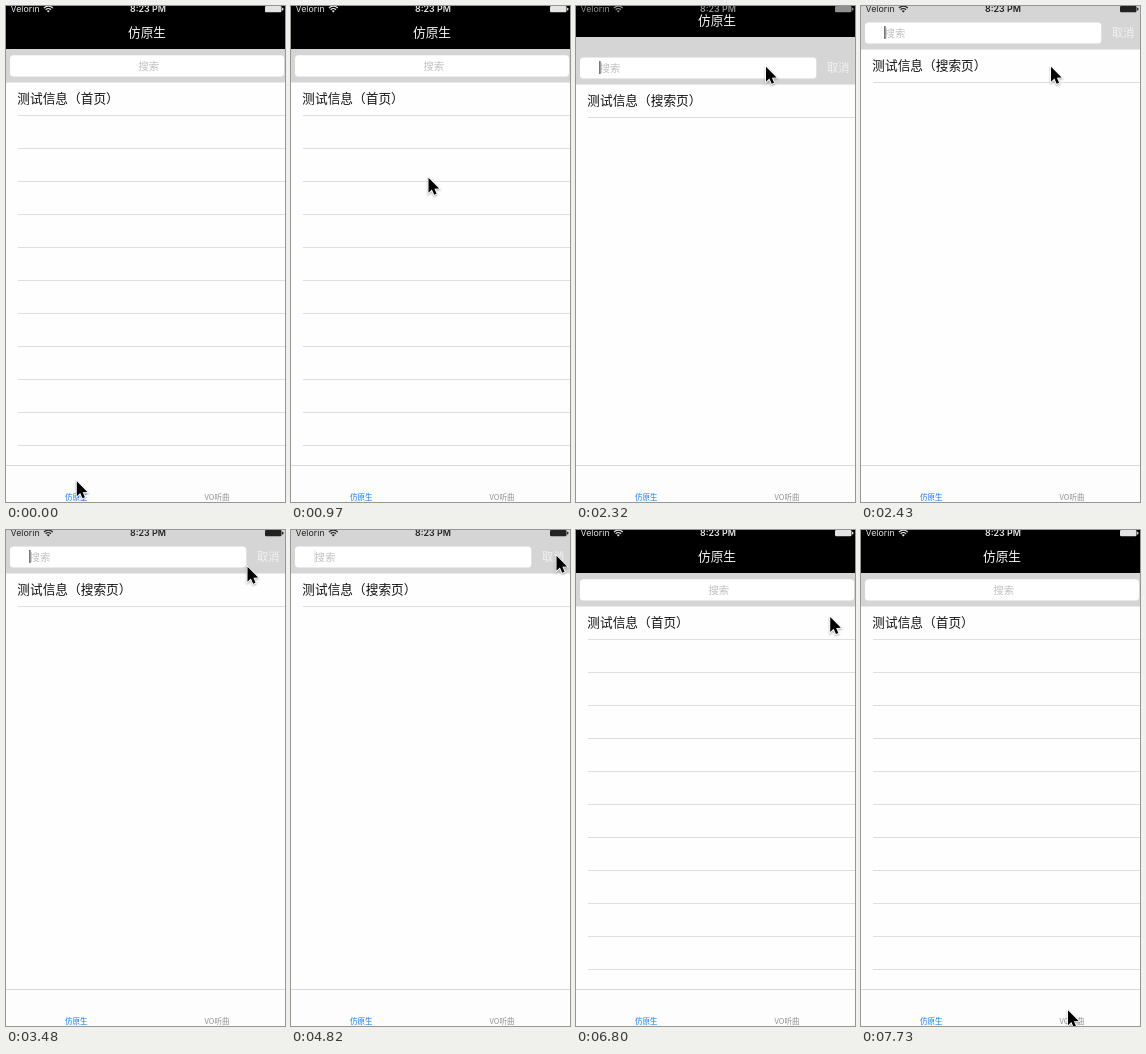
An HTML page with a canvas that plays this animation: 279x496 px, repeating every 8 s.

```html
<!DOCTYPE html>
<html lang="zh-CN">
<head>
<meta charset="utf-8">
<style>
html, body { margin: 0; width: 100%; height: 100%; overflow: hidden; background: #fefefe; }
canvas { display: block; width: 100vw; height: 100vh; }
</style>
</head>
<body>
<canvas id="stage"></canvas>
<script>
const W = 279, H = 496, LOOP = 8000;
const CJK = '"Noto Sans CJK SC", "Noto Sans CJK", sans-serif';
const LATIN = 'Inter, Roboto, sans-serif';
const BAR = '#d5d5d5', LINE = '#dedede', HINT = '#c0c0c0';
const canvas = document.getElementById('stage');
const ctx = canvas.getContext('2d');

// start, end, steps, target x, target y, easing
const smooth = p => p * p * (3 - 2 * p);
const slow = p => 1 - (1 - p) ** 2;
const moves = [
  [500, 970, 9, 137, 171, smooth],
  [1210, 1960, 13, 189.5, 60, smooth],
  [3200, 3480, 6, 241, 36, smooth],
  [3540, 3650, 3, 248, 27, slow],
  [3830, 4290, 8, 265, 25, smooth],
  [6800, 6970, 4, 193, 417, smooth],
  [7270, 7730, 9, 206.5, 479.5, smooth]
];

// start, search open, nav bottom, page offset, status colour
const scenes = [
  [0, false, 43, 0, '#e4e4e4'],
  [2260, true, 40, 42, '#d0d0d0'],
  [2320, true, 31, 35, '#909090'],
  [2375, true, 12, 14, '#707070'],
  [2430, true, 0, 0, '#222'],
  [5970, true, 25, 28, '#909090'],
  [6020, false, 43, 0, '#e4e4e4']
];

// start, caret opacity
const blinks = [
  [0, 1], [2840, .5], [2900, 0], [3200, .5], [3260, 1], [3830, .5], [3885, 0],
  [4190, .5], [4240, 1], [4820, .12], [5220, .6], [5270, 1], [5740, .5], [5800, 0], [5970, 1]
];

const at = (list, t) => list.filter(e => e[0] <= t).pop();

function rect(x, y, w, h, color) {
  ctx.fillStyle = color;
  ctx.fillRect(x, y, w, h);
}

function pill(x, y, w, h, r, color) {
  ctx.fillStyle = color;
  ctx.beginPath();
  ctx.roundRect(x, y, w, h, r);
  ctx.fill();
}

// y is the optical centre of the line
function text(str, x, y, size, color, align = 'left', family = CJK, weight = 400) {
  ctx.font = `${weight} ${size}px ${family}`;
  ctx.textAlign = align;
  ctx.fillStyle = color;
  ctx.fillText(str, x, y + size * .37);
}

function drawStatus(color) {
  text('Velorin', 4.5, 3, 8.9, color, 'left', LATIN);
  text('8:23 PM', 142, 3, 8.9, color, 'center', LATIN, 600);
  ctx.strokeStyle = color;
  ctx.lineWidth = 1.3;
  for (const r of [3.6, 6]) {
    ctx.beginPath();
    ctx.arc(42.3, 6.2, r, -Math.PI * .76, -Math.PI * .24);
    ctx.stroke();
  }
  ctx.fillStyle = color;
  ctx.beginPath();
  ctx.moveTo(42.3, 6.6);
  ctx.arc(42.3, 6.2, 1.9, -Math.PI * .78, -Math.PI * .22);
  ctx.fill();
  pill(259, 0, 16.5, 6.3, 1.2, color);
  pill(276, 1.8, 1.4, 2.6, .6, color);
}

function drawNav(bottom) {
  if (!bottom) return;
  rect(0, 0, W, bottom, '#000');
  text('仿原生', 141, bottom - 16.3, 12.7, '#f4f4f4', 'center');
}

function drawHome() {
  rect(0, 43, W, 33.5, BAR);
  pill(4, 49.3, 274, 21.2, 3.5, '#fff');
  text('搜索', 142.7, 60, 10.4, HINT, 'center');
  text('测试信息（首页）', 11.3, 92.3, 12.7, '#111');
  for (let y = 109; y < 459; y += 33) rect(12, y, W - 12, 1, LINE);
}

function drawSearch(dy, caret) {
  rect(0, 0, W, 43.5 + dy, BAR);
  pill(4, 16.4 + dy, 236.3, 21.2, 3.5, '#fff');
  text('搜索', 23.6, 27 + dy, 10.4, HINT);
  rect(23, 20 + dy, 1.7, 13, `rgba(120,120,120,${caret})`);
  text('取消', 251, 27.2 + dy, 11.2, '#f1f1f1');
  text('测试信息（搜索页）', 11.3, 59.7 + dy, 12.7, '#111');
  rect(12, 76 + dy, W - 12, 1, LINE);
}

function drawTabs() {
  rect(0, 459, W, 37, '#fdfdfd');
  rect(0, 459, W, 1, '#d8d8d8');
  text('仿原生', 70.3, 491, 7.5, '#0a7cff', 'center');
  text('VO听曲', 211, 491, 7.5, '#929292', 'center');
}

function pointer(t) {
  let x = 70.3, y = 474.5;
  for (const [t0, t1, n, tx, ty, ease] of moves) {
    if (t < t0) break;
    const k = Math.min(n, Math.floor((t - t0) / (t1 - t0) * (n - 1)) + 1);
    const p = ease(k / n);
    x += (tx - x) * p;
    y += (ty - y) * p;
  }
  return [x, y];
}

function drawPointer(x, y) {
  const shape = [[0, 0], [0, 15], [3.4, 11.8], [5.7, 17], [8.1, 16], [5.9, 10.9], [10.6, 10.6]];
  ctx.save();
  ctx.translate(x + .5, y + .8);
  ctx.beginPath();
  for (const p of shape) ctx.lineTo(...p);
  ctx.closePath();
  ctx.shadowColor = 'rgba(0,0,0,.35)';
  ctx.shadowBlur = 2;
  ctx.shadowOffsetY = 1;
  ctx.strokeStyle = '#fff';
  ctx.lineWidth = 1.8;
  ctx.stroke();
  ctx.shadowColor = 'transparent';
  ctx.fillStyle = '#000';
  ctx.fill();
  ctx.restore();
}

function draw(t) {
  const [, open, nav, dy, status] = at(scenes, t);
  rect(0, 0, W, H, '#fefefe');
  if (open) drawSearch(dy, at(blinks, t)[1]);
  else drawHome();
  drawNav(nav);
  drawStatus(status);
  drawTabs();
  drawPointer(...pointer(t));
}

function fit() {
  const ratio = window.devicePixelRatio || 1;
  canvas.width = Math.round(innerWidth * ratio);
  canvas.height = Math.round(innerHeight * ratio);
  ctx.setTransform(canvas.width / W, 0, 0, canvas.height / H, 0, 0);
}

fit();
addEventListener('resize', fit);
const start = performance.now();
function tick() {
  draw((performance.now() - start) % LOOP);
  requestAnimationFrame(tick);
}
tick();
</script>
</body>
</html>
```
